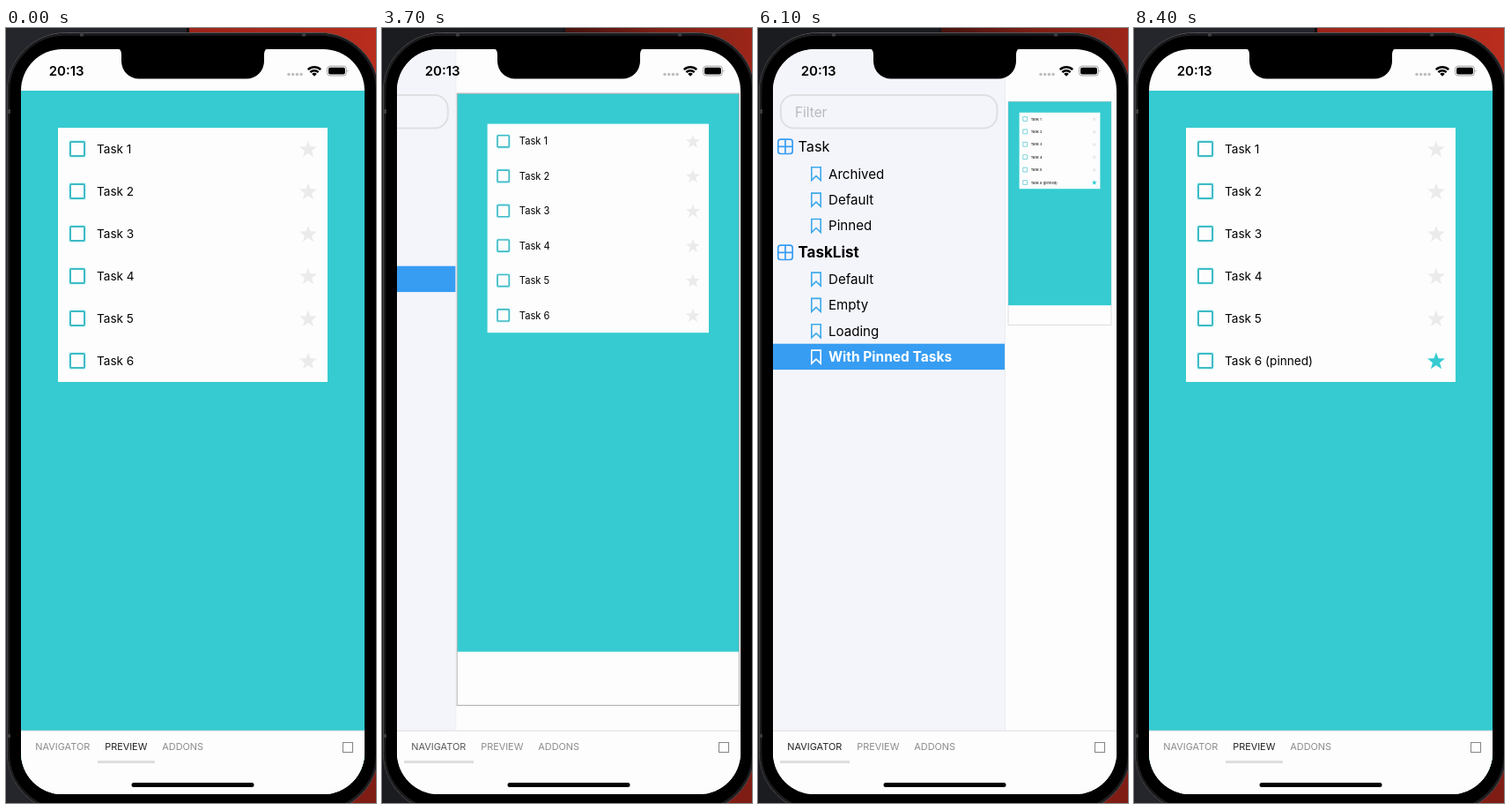
An HTML page for the animation above (8.5 s loop, 420x878 px).

```html
<!DOCTYPE html>
<html lang="en">
<head>
<meta charset="utf-8">
<title>Task list preview</title>
<style>
  html, body { margin: 0; width: 100%; height: 100%; overflow: hidden; background: #000; }
  svg { display: block; width: 100%; height: 100%; font-family: Inter, Roboto, sans-serif; }
</style>
</head>
<body>
<svg id="stage" viewBox="0 0 420 878" preserveAspectRatio="none">
  <defs>
    <clipPath id="screen"><rect x="17" y="24" width="390" height="844" rx="47"/></clipPath>
    <clipPath id="list"><rect x="59" y="113" width="306" height="288"/></clipPath>
    <linearGradient id="dim"><stop stop-color="#45130f"/><stop offset=".5" stop-color="#7d2016"/><stop offset="1" stop-color="#9c2619"/></linearGradient>
    <linearGradient id="lit"><stop stop-color="#9c2519"/><stop offset="1" stop-color="#b92d1d"/></linearGradient>
  </defs>
  <g id="wallpaper"></g>
  <rect x="1.5" y="5.5" width="421" height="882" rx="66" fill="#000" stroke="#555558"/>
  <rect x="3" y="7.5" width="418" height="878" rx="64" fill="none" stroke="#1d1d1f" stroke-width="2.5"/>
  <path d="M84 7.5h4M336 7.5h4M3 92v5M3 800v4" stroke="#3c3c3e" stroke-width="4"/>
  <g clip-path="url(#screen)">
    <rect x="17" y="24" width="390" height="844" fill="#fdfdfd"/>
    <g id="app"></g>
  </g>
  <path d="M125 23q6 0 6 7v7.5a20 20 0 0 0 20 20h122a20 20 0 0 0 20-20v-7.5q0-7 6-7z"/>
  <text x="48.7" y="54.3" font-size="15" font-weight="600">20:13</text>
  <g fill="#bdbdbf">
    <circle cx="321" cy="52.5" r="1.7"/><circle cx="325.7" cy="52.5" r="1.7"/>
    <circle cx="330.4" cy="52.5" r="1.7"/><circle cx="335.1" cy="52.5" r="1.7"/>
  </g>
  <g fill="none" stroke="#000" stroke-width="2.5">
    <path d="M342.8 47.2a10.4 10.4 0 0 1 14.4 0M345.4 50.2a6.6 6.6 0 0 1 9.2 0"/>
    <path d="M347.2 51.9a3.9 3.9 0 0 1 5.6 0l-2.8 2.8z" fill="#000" stroke="none"/>
  </g>
  <rect x="364.5" y="43.2" width="22" height="10.8" rx="3.4" fill="none" stroke="#a0a0a2"/>
  <rect x="366" y="44.7" width="19" height="7.8" rx="2"/>
  <path d="M387.7 46.8q1.6 1.8 0 3.6z" fill="#a0a0a2"/>
</svg>
<script>
const LOOP = 8500, STEP = 100, SLIDE = 300;
const TEAL = '#35cbd1', BLUE = '#379df3';
const get = id => document.getElementById(id);
const clamp = v => Math.min(1, Math.max(0, v));
const ease = k => k < .5 ? (2 * k) ** 1.66 / 2 : 1 - (2 - 2 * k) ** 1.66 / 2;
const progress = (t, start) => ease(clamp((t - start) / SLIDE));

const rect = (x, y, w, h, fill, more = '') =>
  `<rect x="${x}" y="${y}" width="${w}" height="${h}" fill="${fill}" ${more}/>`;
const text = (x, y, size, fill, label, more = '') =>
  `<text x="${x}" y="${y}" font-size="${size}" fill="${fill}" ${more}>${label}</text>`;

const starPoints = Array.from({ length: 10 }, (_, i) => {
  const r = i % 2 ? 4.3 : 10.4, a = Math.PI * (i / 5 - .5);
  return `${343 + r * Math.cos(a)},${.8 + r * Math.sin(a)}`;
}).join(' ');

// Sidebar entries; each press dims a row, then selects it.
const stories = [
  ['Archived', 165], ['Default', 194.4], ['Pinned', 223.8],
  ['Default', 284.4], ['Empty', 313.7], ['Loading', 343.1], ['With Pinned Tasks', 372.4]
];
const taps = [
  { row: 4, press: 4500, select: 4600 },
  { row: 5, press: 5200, select: 5300 },
  { row: 6, press: 5700, select: 5900 }
];
const pressOpacity = (t, press, select) =>
  t < press ? 1 : t < select ? .2 : Math.min(1, .35 + (t - select) / 230);

function wallpaper(t) {
  const lit = t < 2500 || t >= 8400;
  return rect(0, 0, 420, 878, lit ? '#25262c' : '#1b1c20')
    + rect(208, 0, 212, 400, `url(#${lit ? 'lit' : 'dim'})`)
    + rect(208, 400, 212, 478, '#7f1d15')
    + rect(205, 0, 3, 6, lit ? '#0c0c0e' : '#17171a');
}

function task(i, pinned, scroll) {
  const done = pinned && i === 6;
  return `<g transform="translate(0 ${89 + 48 * i + scroll})">`
    + rect(73, -8, 16, 16, 'none', 'rx="1" stroke="#d8f7f8" stroke-width="4.5"')
    + rect(73, -8, 16, 16, '#fdfdfd', 'rx="1" stroke="#3fbac6" stroke-width="2"')
    + text(103, 5, 13.6, '#000', `Task ${i}${done ? ' (pinned)' : ''}`)
    + `<polygon points="${starPoints}" fill="${done ? TEAL : '#ebebeb'}"/></g>`;
}

function preview(t, p, selected, framed) {
  const scroll = t >= 2500 && t < 3300 ? -13 * Math.sin(Math.PI * (t - 2400) / 900) ** 2 : 0;
  const content = selected === 4 ? text(59, 125, 13, '#000', 'empty')
    : selected === 5 ? text(59, 125, 13, '#000', 'loading')
    : [1, 2, 3, 4, 5, 6].map(i => task(i, selected === 6, scroll)).join('');
  return `<g transform="translate(${17 + 267 * p} ${71 + 12.2 * p}) scale(${1 - .7 * p}) translate(-17 -71)">`
    + rect(17, 71, 390, 844, '#fdfdfd')
    + rect(17, 71, 390, 770, TEAL)
    + rect(59, 113, 306, 288, '#fdfdfd')
    + `<g clip-path="url(#list)">${content}</g>`
    + (framed ? rect(17, 71, 390, 844, 'none', 'stroke="#b4b4b8" stroke-width="1.4"') : '')
    + '</g>';
}

function group(y, label, bold) {
  return `<path d="M22.8 ${y + .3}h16.4M31 ${y - 7.9}v16.4" stroke="${BLUE}" stroke-width="1.7"/>`
    + rect(22.8, y - 7.9, 16.4, 16.4, 'none', `rx="3" stroke="${BLUE}" stroke-width="1.7"`)
    + text(45.5, y + 6, bold ? 17 : 16.3, '#000', label, bold ? 'font-weight="700"' : '');
}

function story([label, y], i, t, selected) {
  const on = i === selected;
  const tap = taps.find(item => item.row === i);
  const opacity = tap ? pressOpacity(t, tap.press, tap.select) : 1;
  return `<g opacity="${opacity}">`
    + (on ? rect(17, y - 14.7, 263, 29.4, BLUE) : '')
    + `<path d="M60.8 ${y - 7.3}h10.4v15l-5.2-5l-5.2 5z" fill="none" stroke="${on ? '#fff' : '#3ea9ea'}" stroke-width="1.6"/>`
    + text(80, y + 5.5, on ? 15.5 : 15.1, on ? '#fff' : '#000', label, on ? 'font-weight="700"' : '')
    + '</g>';
}

function sidebar(t, p, selected) {
  if (!p) return '';
  return `<g transform="translate(${264 * (p - 1)} 0)">`
    + rect(17, 24, 263.5, 773, '#f4f5fb')
    + rect(280, 24, 1, 773, '#ececf0')
    + rect(25.8, 76, 245.6, 37.5, 'none', 'rx="15" stroke="#dfdfe1" stroke-width="2"')
    + text(42, 101, 15.4, '#b9b9bd', 'Filter')
    + group(134, 'Task', false) + group(254, 'TaskList', true)
    + stories.map((item, i) => story(item, i, t, selected)).join('')
    + '</g>';
}

function tabBar(t, navigating) {
  const tab = (x, label, on, opacity = 1) => text(x, 817.6, 10.9, on ? '#222' : '#8c8c8e', label,
    `text-anchor="middle" opacity="${opacity}"`);
  const pressed = t >= 3500 && t < 3700 ? .2 : t === 3700 ? .75 : 1;
  return rect(17, 796, 390, 72, '#fdfdfd')
    + rect(17, 795.7, 390, 1, '#dedee1')
    + tab(64.3, 'NAVIGATOR', navigating, pressed)
    + tab(136.3, 'PREVIEW', !navigating)
    + tab(200.7, 'ADDONS', false)
    + (navigating ? rect(25, 830, 79, 3, '#dedede') : rect(104, 830, 65, 3, '#dedede'))
    + rect(382.5, 809.5, 11, 11, 'none', 'stroke="#858587"')
    + rect(142.5, 855, 139, 5, '#000', 'rx="2.5"');
}

function draw(t) {
  const p = progress(t, 3600) - progress(t, 6966);
  const navigating = t >= 3700 && t < 7000;
  const selected = taps.reduce((row, tap) => t >= tap.select ? tap.row : row, 3);
  get('wallpaper').innerHTML = wallpaper(t);
  get('app').innerHTML = preview(t, p, selected, navigating) + sidebar(t, p, selected) + tabBar(t, navigating);
}

let shown = -1;
const origin = performance.now();
function tick() {
  const t = Math.floor((performance.now() - origin) % LOOP / STEP) * STEP;
  if (t !== shown) draw(shown = t);
  requestAnimationFrame(tick);
}
tick();
</script>
</body>
</html>
```
